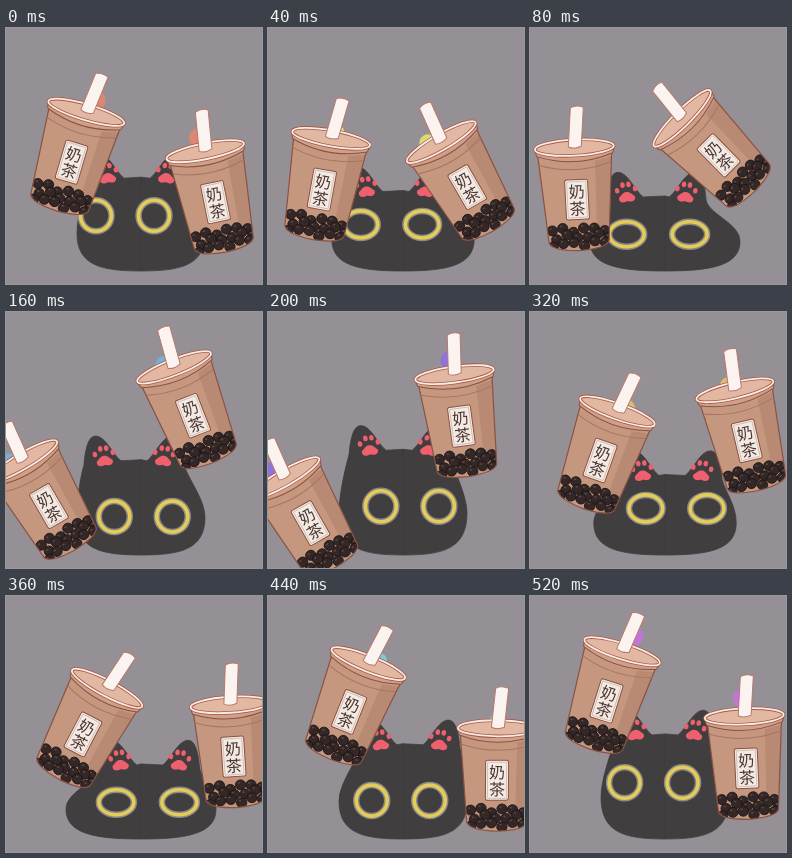
Animation of 256 by 256 pixels, one loop 0.56 s. Source, as an HTML page with a canvas:

```html
<!DOCTYPE html>
<html lang="zh">
<head>
<meta charset="utf-8">
<style>
  html, body { margin: 0; height: 100%; overflow: hidden; background: #949095; }
  canvas { display: block; width: 100vmin; height: 100vmin; }
</style>
</head>
<body>
<canvas width="256" height="256"></canvas>
<script>
const ctx = document.querySelector('canvas').getContext('2d');
const LOOP = 560, STEP = 40;
const GREY = '#949095', FUR = '#403e3f', INK = '#8a5243';

// Sum of cosines, each given as [harmonic, amplitude, phase]
const wave = (angle, mean, ...terms) =>
  terms.reduce((sum, [n, size, phase]) => sum + size * Math.cos(n * angle - phase), mean);

const leftCup = a => ({
  x: wave(a, 62, [1, 21, -1.4], [3, 2.4, -1.57]),
  y: wave(a, 155, [1, 47.6, 2.13], [3, 11.9, 1.19]),
  tilt: wave(a, 4.4, [1, 26, -1.3], [2, 10.6, 1.07])
});
const rightCup = a => ({
  x: wave(a, 208, [1, 22.3, -1.6], [3, 2.4, 0.43]),
  y: wave(a, 144, [1, 41, -1], [3, 11.7, 0.82]),
  tilt: wave(a, -14.2, [1, 16.2, -1.85], [2, 10.1, -1.5], [3, 6.6, 0.15])
});

function paint(path, fill, stroke, width = 1) {
  if (fill) { ctx.fillStyle = fill; ctx.fill(path); }
  if (stroke) { ctx.strokeStyle = stroke; ctx.lineWidth = width; ctx.stroke(path); }
}
const shape = (d, ...style) => paint(new Path2D(d), ...style);
function oval(x, y, rx, ry, ...style) {
  const path = new Path2D();
  path.ellipse(x, y, rx, ry, 0, 0, 7);
  paint(path, ...style);
}

function drawPaw(x, y, side) {
  const pink = '#ee606d';
  ctx.save();
  ctx.translate(x, y);
  ctx.rotate(side * 0.12);
  for (let i = -1.5; i < 2; i++) oval(i * 6, 1 - 8 * Math.cos(i * 0.85), 2.3, 2.8, pink);
  shape('M0 1C4 1 5 4 8 6C9 11 4 12 0 10C-4 12 -9 11 -8 6C-5 4 -4 1 0 1Z', pink);
  ctx.restore();
}

// The head bounces twice per loop while ears and eyes sway once
function drawCat(a) {
  const bounce = Math.cos(2 * a - 1.75), squash = Math.max(0, bounce);
  const pawY = 147 + 16 * bounce, top = pawY + 6, tip = pawY - 19;
  const w = 64 + 11 * squash, mid = top + (243 - top) * 0.6;
  const earX = 135 - 9 * Math.sin(a + 0.45);
  const eyeX = 135 + 16 * (1 - 2 * Math.abs(1 - a / Math.PI));
  const eyeY = 198 + 12 * Math.cos(2 * a - 2.6);

  const head = new Path2D();
  for (const side of [-1, 1]) {
    const ear = d => earX + side * d, body = d => 135 + side * d;
    head.moveTo(135, 243);
    head.bezierCurveTo(body(w * 0.6), 243, body(w), 238, body(w), mid);
    head.bezierCurveTo(body(w), mid - 18, ear(54), top + 18, ear(50), top + 4);
    head.bezierCurveTo(ear(48), tip + 5, ear(43), tip - 2, ear(35), tip + 1);
    head.bezierCurveTo(ear(27), tip + 4, ear(20), top - 5, ear(13), top);
    head.lineTo(135, top - 1);
    head.closePath();
  }
  paint(head, FUR, FUR, 0.8);

  const rx = 15.5 + 2 * squash, ry = 15.5 - 3 * squash;
  for (const side of [-1, 1]) {
    const x = eyeX + side * (29 + 2.5 * squash);
    drawPaw(earX + side * 30, pawY, side);
    oval(x, eyeY, rx, ry, null, '#8b878a', 6.5);
    oval(x, eyeY, rx, ry, null, '#e3cc58', 3.6);
  }
}

function drawCup({ x, y, tilt }, a) {
  ctx.save();
  ctx.translate(x, y);
  ctx.rotate(tilt * Math.PI / 180);
  ctx.lineJoin = 'round';

  // Glow that cycles in hue and rises behind the lid
  const hue = 2 * a * 180 / Math.PI * 0.95 + 10;
  oval(tilt * 0.4, -59 - 11 * Math.cos(2 * a + 0.9), 9, 10, `hsl(${hue} 60% 66%)`);

  const body = new Path2D('M-37 -46L-30 42Q-28 50 0 51Q28 50 30 42L37 -46Z');
  paint(body, '#c6977f');
  shape('M20 -38L37 -42L30 43L18 48Z', '#b98a73');

  // Tapioca pearls stay inside the cup
  ctx.save();
  ctx.clip(body);
  for (let row = 0; row < 3; row++)
    for (let i = 0; i < 6; i++) {
      const px = (i - 2.5) * 10.5 + (row % 2) * 4;
      const py = 30 + row * 7 + 2.5 * Math.sin(i * 4 + row);
      oval(px, py, 5.2, 5, '#332827', '#1b1413', 0.8);
      oval(px - 1.5, py - 2, 1.3, 0.8, '#5c4a47');
    }
  ctx.restore();
  paint(body, null, INK, 1.2);

  // Lid and straw
  shape('M-40 -52L-38 -45Q0 -31 38 -45L40 -52Z', '#cf9f88', INK);
  shape('M-36 -36Q0 -24 36 -36', null, '#a8745f');
  oval(0, -52, 39.5, 8, '#e2b8a3', '#a75a48', 3.4);
  oval(0, -52, 39.5, 8, null, '#f8ece4', 1.8);
  shape('M-2 -92Q4 -95 11 -92L7 -53Q0 -50 -6 -53Z', '#faf3ef', '#b9786b');

  // Label
  const label = new Path2D();
  label.roundRect(-11.5, -20, 23, 40, 2);
  paint(label, '#f3eae4', INK);
  ctx.strokeStyle = '#c9aea2';
  ctx.lineWidth = 0.7;
  ctx.strokeRect(-9.5, -18, 19, 36);
  ctx.fillStyle = '#4a3530';
  ctx.font = '300 16px "Noto Sans CJK SC", "Noto Sans CJK", sans-serif';
  ctx.textAlign = 'center';
  ctx.textBaseline = 'middle';
  ctx.fillText('奶', 0, -8);
  ctx.fillText('茶', 0, 9);
  ctx.restore();
}

function frame(now) {
  const a = Math.floor(now % LOOP / STEP) * STEP / LOOP * 2 * Math.PI;
  ctx.fillStyle = GREY;
  ctx.fillRect(0, 0, 256, 256);
  drawCat(a);
  drawCup(leftCup(a), a);
  drawCup(rightCup(a), a);
  requestAnimationFrame(frame);
}
requestAnimationFrame(frame);
</script>
</body>
</html>
```
